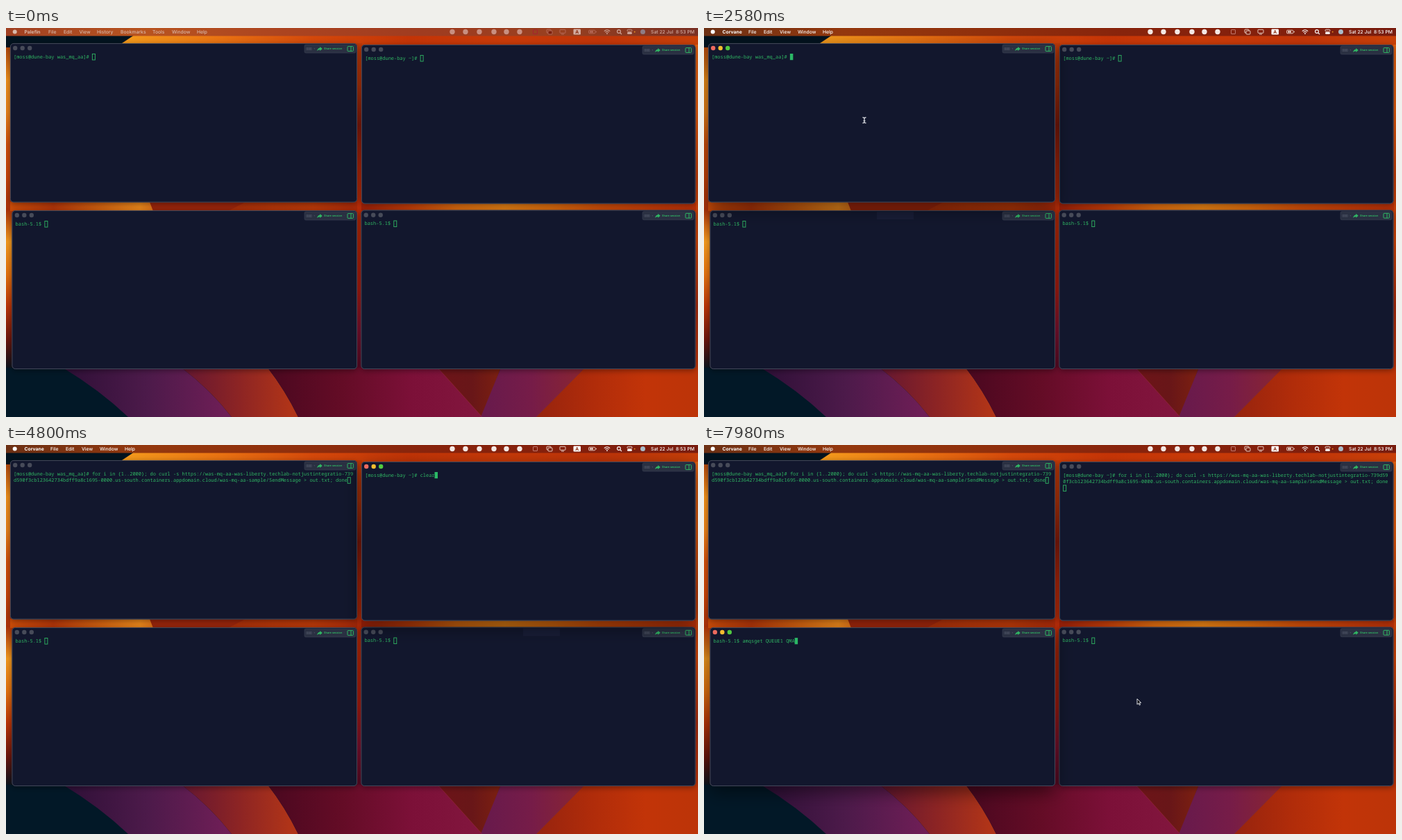
Recreate the animation shown at these times as an HTML page with a canvas. Size 997 by 561 pixels, loop 8 s.

```html
<!DOCTYPE html>
<html lang="en">
<head>
<meta charset="utf-8">
<title>Four terminals</title>
<style>
html, body { margin: 0; width: 100%; height: 100%; overflow: hidden; background: #02131f; }
canvas { display: block; }
</style>
</head>
<body>
<canvas id="stage" width="997" height="561"></canvas>
<script>
const W = 997, H = 561, LOOP = 8000, CELL = 4.18, LINE = 9.3;
const ctx = document.getElementById('stage').getContext('2d');
const GREEN = '#30b864';
const MONO = '6.97px "Noto Sans Mono", "DejaVu Sans Mono", monospace';
const SANS = 'Inter, Roboto, sans-serif';

const command = 'for i in {1..2000}; do curl -s https://was-mq-aa-was-liberty.techlab-notjustintegratio-739' +
  'd590f3cb123642734bdff9a8c1695-0000.us-south.containers.appdomain.cloud/was-mq-aa-sample/SendMessage > out.txt; done';

// Typed text between two times
const typed = (text, t, from, to) =>
  text.slice(0, Math.max(0, Math.floor((t - from) / (to - from) * text.length + 0.01)));

const terminals = [
  { x: 6, y: 22, w: 500, h: 229.5, dots: [13.2, 29], tools: [430, 24], text: [11, 41.6], cols: 117,
    prompt: '[moss@dune-bay was_mq_aa]# ', active: [1260, 4230], focus: 1950,
    input: t => t >= 2700 ? command : '' },
  { x: 512, y: 24, w: 481.5, h: 229.5, dots: [519.2, 31], tools: [917, 26], text: [517.2, 43.6], cols: 112,
    prompt: '[moss@dune-bay ~]# ', active: [4230, 6090],
    input: t => t >= 5160 ? command : t < 5000 ? typed('clear', t, 4400, 4770) : '' },
  { x: 8.5, y: 263, w: 497.5, h: 229, dots: [15.8, 270], tools: [430, 265], text: [13.6, 282.7], cols: 117,
    prompt: 'bash-5.1$ ', active: [6090, LOOP], tab: [249, 1260, 4230],
    input: t => typed('amqsget QUEUE1 QMA', t, 6800, 7750) },
  { x: 511.5, y: 262.5, w: 482, h: 229.5, dots: [518.7, 269.7], tools: [917, 264.7], text: [516.5, 282.2], cols: 112,
    prompt: 'bash-5.1$ ', active: [LOOP, LOOP], tab: [745, 4230, 6090],
    input: () => '' }
];

// Each pointer trip: [time, x, y], ...
const trips = [
  [[600, 470, 540], [1150, 228, 152], [1710, 225, 137], [2100, 231, 133], [3660, 231, 133], [4150, 640, 140], [4400, 640, 140]],
  [[5340, 640, 140], [5670, 322, 310], [6000, 268, 335], [6300, 268, 335]],
  [[7620, 268, 335], [7960, 625, 370], [8000, 625, 370]]
];
const between = (t, [a, b]) => t >= a && t < b;

function linear(x0, y0, x1, y1, colors) {
  const g = ctx.createLinearGradient(x0, y0, x1, y1);
  colors.forEach((c, i) => g.addColorStop(i / (colors.length - 1), c));
  return g;
}
function rect(x, y, w, h, fill) {
  ctx.fillStyle = fill;
  ctx.fillRect(x, y, w, h);
}
function round(x, y, w, h, r, fill, stroke) {
  ctx.beginPath();
  ctx.roundRect(x, y, w, h, r);
  if (fill) { ctx.fillStyle = fill; ctx.fill(); }
  if (stroke) { ctx.strokeStyle = stroke; ctx.stroke(); }
}
function disc(x, y, r, fill) {
  ctx.beginPath();
  ctx.arc(x, y, r, 0, 7);
  ctx.fillStyle = fill;
  ctx.fill();
}
function path(d, fill, stroke) {
  const p = new Path2D(d);
  if (fill) { ctx.fillStyle = fill; ctx.fill(p); }
  if (stroke) { ctx.strokeStyle = stroke; ctx.stroke(p); }
}
function label(text, x, y, font, fill) {
  ctx.font = font;
  ctx.fillStyle = fill;
  ctx.fillText(text, x, y);
}

function wallpaper() {
  rect(0, 0, W, H, '#a82a08');
  // Upper petals
  rect(0, 0, W, 30, linear(165, 0, W, 0, ['#f59c1c', '#ea7412', '#d4480a', '#c43406', '#c83a08', '#c03408', '#c84008']));
  path('M0 0H200L164 24V30H0Z', '#02131f');
  rect(0, 28, 9, 467, linear(0, 28, 0, 495, ['#b0480e', '#f0901a', '#e8821a', '#d0500c', '#c84408', '#a83008', '#f0981e', '#e0700e', '#b83408', '#6c160c', '#02131f']));
  rect(993, 24, 4, 470, linear(0, 24, 0, 494, ['#e06010', '#e05a0c', '#c03c08', '#cc4408', '#a42a0c', '#c03408']));
  rect(505, 22, 8, 472, linear(0, 22, 0, 494, ['#c03a08', '#a83008', '#7c180a', '#a82408', '#b82c08', '#b02408', '#a81c10', '#7c1230', '#580a24']));
  // Strip between the window rows
  rect(6, 251, 500, 13, linear(6, 0, 506, 0, ['#cc4c08', '#b03408', '#cc5c0e', '#e8861a', '#b83c0c', '#a42c08', '#b03408', '#b83808', '#a82808']));
  path('M207 251H345L320 264H212Z', '#98240a');
  rect(512, 253, 482, 10, linear(512, 0, 994, 0, ['#a02008', '#c03c08', '#d8680e', '#e07c12', '#d8680c', '#cc4c08', '#c43c08', '#b83008']));
  // Lower petals
  rect(0, 490, W, 71, '#021827');
  path('M82 490Q135 522 176 561H325Q295 522 253 490Z', linear(90, 0, 315, 0, ['#301038', '#4c1a4a', '#6e1e56']));
  path('M253 490Q295 522 325 561H421Q402 522 377 490Z', linear(260, 0, 410, 0, ['#681830', '#8c2424', '#b03418']));
  path('M377 490Q402 522 421 561H690L622 490Z', linear(385, 0, 685, 0, ['#4c0820', '#640c26', '#7c1038', '#82163e']));
  path('M622 490L686 561L713 490Z', linear(630, 0, 712, 0, ['#6c1418', '#681618', '#7c2010']));
  path('M713 490L684 561H764L834 490Z', linear(690, 0, 825, 0, ['#681a4c', '#761c48', '#882434']));
  path('M834 490L764 561H997V490Z', linear(770, 0, 997, 0, ['#98240e', '#b02c0a', '#c23408', '#bc3408']));
  ctx.lineWidth = 0.8;
  path('M622 490L686 561M834 490L764 561', null, 'rgba(170,50,64,.5)');
}

function menuBar(t) {
  const on = t >= 1260, bright = t >= 2000;
  rect(0, 0, W, 11.5, on
    ? linear(0, 0, W, 0, ['#6c3014', '#94380e', '#90300c', '#88240c', '#84200c', '#781c0e'])
    : linear(0, 0, W, 0, ['#a04022', '#b85420', '#ac4420', '#a03c20', '#984020', '#783024']));
  const main = on ? '#fff' : '#d9b9ab';
  const side = bright ? '#fff' : '#d2aba0';
  const icons = on ? '#f4e8e4' : '#c88f80';
  disc(12.7, 5.4, 3, main);
  const items = on
    ? [['File', 64], ['Edit', 86], ['View', 109], ['Window', 135], ['Help', 171]]
    : [['File', 61], ['Edit', 83], ['View', 105.5], ['History', 131], ['Bookmarks', 165], ['Tools', 211], ['Window', 239], ['Help', 275]];
  label(on ? 'Corvane' : 'Palefin', 26.5, 5.5, '700 6.8px ' + SANS, main);
  for (const [text, x] of items) label(text, x, 5.5, '500 6.8px ' + SANS, main);

  for (const x of [643, 662, 682, 703, 721, 740]) disc(x, 5.5, 3.7, icons);
  ctx.lineWidth = 0.9;
  const dim = bright ? '#f0dcd4' : '#b86c5c';
  round(759.5, 2.5, 6, 6, 0.5, null, bright ? '#c88078' : '#a82030');
  round(779, 2, 6, 5, 1, null, dim);
  round(781, 4, 6, 5, 1, '#7c200c', dim);
  round(798, 2.3, 8, 5, 0.8, null, dim);
  path('M800 9H804', null, dim);
  round(817.5, 1.5, 10.5, 8, 1.2, side);
  label('A', 820.3, 5.7, '700 6.6px ' + SANS, '#8a2c10');
  round(839.5, 3.2, 9.5, 4.6, 1.3, null, dim);
  rect(841, 4.4, 5, 2.2, dim);
  rect(849.8, 4.7, 1, 1.6, dim);
  ctx.lineWidth = 1.1;
  path('M861.8 4.6Q866 .8 870.2 4.6M863.5 6.3Q866 4.2 868.5 6.3', null, side);
  disc(866, 8, 0.9, side);
  ctx.beginPath();
  ctx.arc(883, 5, 2.4, 0, 7);
  ctx.stroke();
  path('M884.8 6.8L887 9', null, side);
  ctx.lineWidth = 0.8;
  round(895, 2.2, 7, 2.8, 1.4, null, side);
  round(895, 6, 7, 2.8, 1.4, side);
  disc(905.7, 5.6, 0.9, '#f39a22');
  disc(917.5, 5.5, 3.5, bright ? '#a9bcc9' : '#8f7c84');
  label('Sat 22 Jul  8:53 PM', 929, 5.5, '500 6.8px ' + SANS, side);
}

function toolbar(x, y) {
  ctx.lineWidth = 0.6;
  round(x, y, 74, 12, 2, '#2a3042', '#3c4254');
  for (let i = 0; i < 3; i++) round(x + 3 + i * 2.7, y + 4.6, 1.8, 3, 0.4, null, '#596071');
  label('+', x + 13, y + 6.2, '4px ' + SANS, '#596071');
  path(`M${x + 18.2} ${y + 9}q.6-4 4.1-4.2v-1.8l3.5 3-3.5 3v-1.8q-2.4 0-4.1 1.8Z`, GREEN);
  label('Share session', x + 28, y + 6.3, '600 3.9px ' + SANS, GREEN);
  label('·', x + 57, y + 6.2, '4px ' + SANS, '#707788');
  ctx.lineWidth = 1;
  round(x + 62, y + 2.6, 8.4, 6.8, 0.8, null, GREEN);
  path(`M${x + 67} ${y + 2.6}v6.8`, null, GREEN);
}

function terminal(s, t) {
  const active = between(t, s.active);
  ctx.save();
  ctx.shadowColor = active ? 'rgba(0,0,0,.5)' : 'rgba(0,0,0,.4)';
  ctx.shadowBlur = active ? 26 : 8;
  ctx.shadowOffsetY = active ? 8 : 2;
  round(s.x, s.y, s.w, s.h, 5, '#12172d');
  ctx.restore();
  ctx.lineWidth = 0.8;
  round(s.x + 0.4, s.y + 0.4, s.w - 0.8, s.h - 0.8, 4.6, null, '#535867');
  if (s.tab && between(t, s.tab.slice(1))) rect(s.tab[0], s.y + 2, 53, 11, '#181d36');
  ['#ed6a5e', '#f5bd2f', '#50c941'].forEach((c, i) =>
    disc(s.dots[0] + i * 10.5, s.dots[1], 3.2, active ? c : '#474b59'));
  toolbar(...s.tools);

  const text = s.prompt + s.input(t);
  const [x, y] = s.text;
  for (let i = 0; i < text.length; i += s.cols)
    label(text.slice(i, i + s.cols), x, y + i / s.cols * LINE, MONO, GREEN);
  const cx = x + text.length % s.cols * CELL;
  const cy = y + Math.floor(text.length / s.cols) * LINE - 4.6;
  if (active && t >= (s.focus || 0)) rect(cx, cy, 4.5, 9.2, '#2bb866');
  else {
    ctx.lineWidth = 0.9;
    ctx.strokeStyle = GREEN;
    ctx.strokeRect(cx + 0.5, cy + 0.4, 4, 8.6);
  }
}

function pointer(t) {
  const trip = trips.find(p => between(t, [p[0][0], p.at(-1)[0]]));
  if (!trip) return;
  const i = trip.findIndex(p => p[0] > t);
  const [t0, x0, y0] = trip[i - 1], [t1, x1, y1] = trip[i];
  const u = (t - t0) / (t1 - t0), k = u * u * (3 - 2 * u);
  ctx.save();
  ctx.translate(x0 + (x1 - x0) * k, y0 + (y1 - y0) * k);
  if (between(t, [1950, 3720]) || between(t, [4260, 4400])) {
    ctx.lineWidth = 1.3;
    path('M-2.5-4Q0-4 0-2.5Q0-4 2.5-4M0-2.5V2.5M-2.5 4Q0 4 0 2.5Q0 4 2.5 4M-1.4.8H1.4', null, '#d8dae0');
  } else {
    ctx.lineWidth = 0.9;
    path('M-1-4V4.2L1 2.4L2.3 5.2L3.6 4.6L2.3 1.8H4.8Z', '#0c0e16', '#eceef2');
  }
  ctx.restore();
}

// The most recently activated window lies on top
function stacked(t) {
  const raised = s => s.active[0] <= t ? s.active[0] : 0;
  return [...terminals].sort((a, b) => raised(a) - raised(b));
}

function draw(now) {
  const t = now % LOOP;
  ctx.textBaseline = 'middle';
  ctx.textRendering = 'geometricPrecision';
  wallpaper();
  stacked(t).forEach(s => terminal(s, t));
  menuBar(t);
  pointer(t);
}

const start = performance.now();
function tick() {
  draw(performance.now() - start);
  requestAnimationFrame(tick);
}
tick();
</script>
</body>
</html>
```
